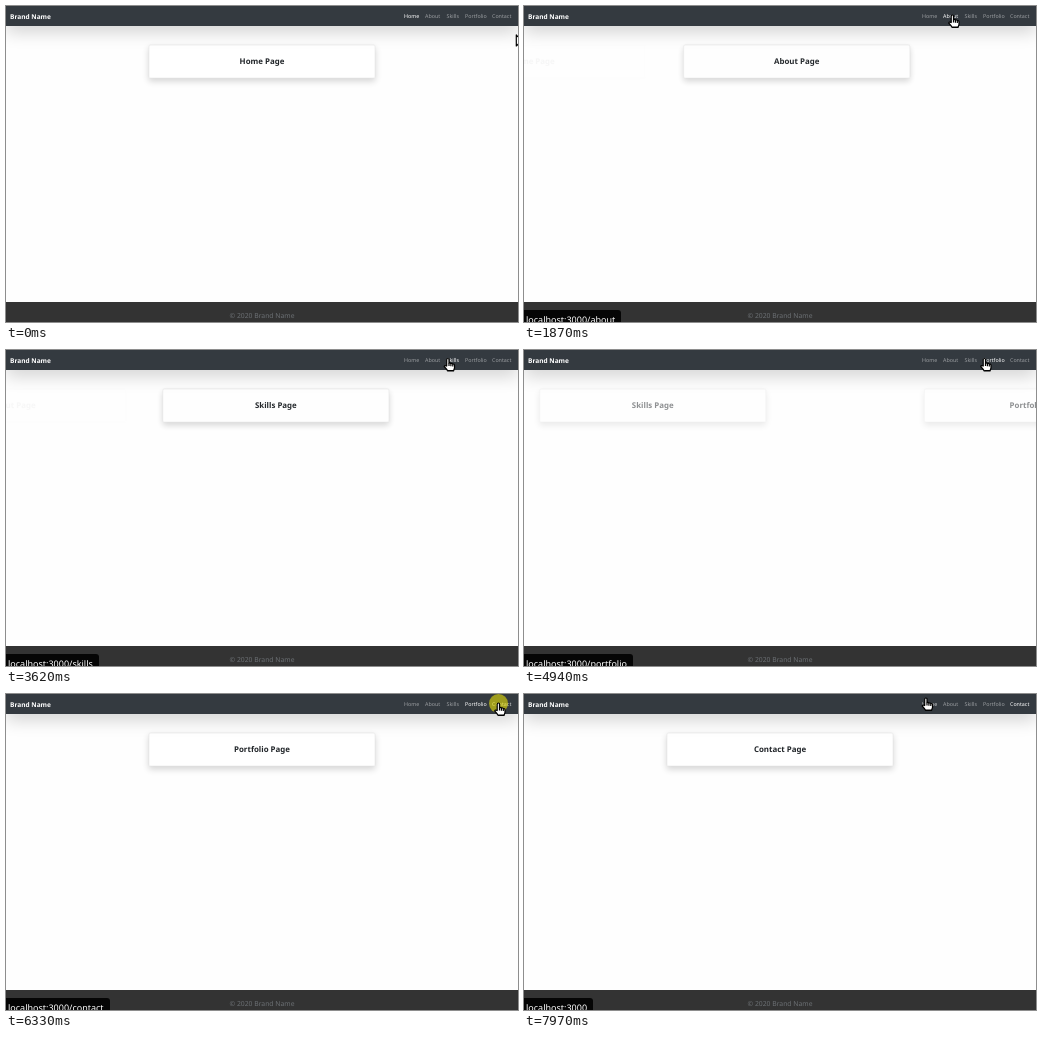
Animation of 512x316 px, one loop 8000 ms. Source, as an HTML page:

```html
<!DOCTYPE html>
<html lang="en">
<head>
<meta charset="utf-8">
<title>Page transitions</title>
<style>
  html, body { margin: 0; width: 100%; height: 100%; overflow: hidden; }
  body {
    position: relative;
    background: #fefefe;
    font-family: "Noto Sans", "Open Sans", sans-serif;
    text-rendering: geometricPrecision;
    white-space: nowrap;
  }
  #stage { position: absolute; left: 0; top: 0; width: 512px; height: 316px; overflow: hidden; }
  #stage > * { position: absolute; }
  nav {
    left: 0; top: 0; width: 512px; height: 20px;
    line-height: 20px;
    background: #343a40;
    box-shadow: 0 6px 17px rgba(0, 0, 0, .175);
  }
  nav * { position: absolute; top: 0; }
  nav b { left: 4px; font-size: 6.55px; font-weight: 600; line-height: 21px; color: #fff; }
  nav span { font-size: 5.35px; color: rgba(255, 255, 255, .5); }
  nav .hover { color: rgba(255, 255, 255, .75); }
  nav .active { color: #fff; }
  .card {
    box-sizing: border-box;
    left: 142px; top: 38px; width: 227px; height: 34px;
    border: 1px solid rgba(0, 0, 0, .06);
    border-radius: 2px;
    background: #fff;
    box-shadow: 0 3px 6px rgba(0, 0, 0, .16);
    font-size: 7.9px; font-weight: 600; line-height: 32px;
    text-align: center;
    color: #212529;
  }
  footer {
    left: 0; top: 296px; width: 512px; height: 20px;
    background: #333;
    color: #6c7074;
    font-size: 6.8px; line-height: 27px;
    text-align: center;
  }
  #status {
    left: 0; top: 304px; height: 12px;
    padding: 0 6px 0 2px;
    overflow: hidden;
    border-radius: 0 3px 0 0;
    background: #050505;
    color: #fff;
    font-size: 9px; line-height: 19px;
  }
  #press {
    width: 19px; height: 19px;
    margin: -9.5px;
    border-radius: 50%;
    background: rgba(255, 246, 0, .53);
  }
  #cursor { left: 0; top: 0; width: 512px; height: 316px; }
  #cursor path { fill: #fff; stroke: #000; stroke-width: 1.2; stroke-linejoin: round; }
</style>
</head>
<body>
<div id="stage">
  <nav><b>Brand Name</b></nav>
  <footer>© 2020 Brand Name</footer>
  <div id="status"></div>
  <div id="press"></div>
  <svg id="cursor" viewBox="0 0 512 316">
    <path id="arrow" d="M0 0V11L2.6 8.6L4.3 12.4L6 11.6L4.3 8H7.8Z"/>
    <g id="hand">
      <path d="M-1.3 7.5V1.2Q-1.3 0 -.1 0T1 1.2V4.6Q2 4 2.9 5Q4 4.5 4.8 5.5Q6.5 5.3 6.5 7V9.5Q6 11 5.5 12.5H-.3Q-1 11 -3.8 8Q-3.6 6.4 -1.3 7.5Z"/>
      <path d="M1 4.6V7.6M2.9 5V7.8M4.8 5.5V8M-.3 12H5.5"/>
    </g>
  </svg>
</div>
<script>
const LOOP = 8000, REFRESH = 77, WIDTH = 512;
const $ = id => document.getElementById(id);
const stage = $('stage'), nav = document.querySelector('nav');

// name, link position, mouse press, page opening
const pages = [
  ['Home', 398, 0, -LOOP],
  ['About', 419, 1150, 1440],
  ['Skills', 440.5, 2890, 3163],
  ['Portfolio', 459, 4550, 4807],
  ['Contact', 486, 6330, 6480]
].map(([name, left, press, open]) => {
  const link = document.createElement('span');
  link.textContent = name;
  link.style.left = left + 'px';
  nav.append(link);
  const card = document.createElement('div');
  card.className = 'card';
  card.textContent = name + ' Page';
  stage.prepend(card);
  const path = name === 'Home' ? '' : '/' + name.toLowerCase();
  return { left, press, open, path, link, card };
});

// pointer moves: departure, arrival, x, y
const moves = [
  [80, 840, 428.5, 9],
  [2200, 2280, 442, 8.5],
  [3900, 4080, 460.5, 8.5],
  [5570, 5720, 492.5, 9],
  [7570, 7940, 402, 4]
];

// critically damped spring, tension 170
function spring(ms) {
  const x = Math.max(0, ms) / 1000 * Math.sqrt(170);
  return 1 - (1 + x) * Math.exp(-x);
}

function pointer(t) {
  let x = 510.3, y = 29;
  for (const [from, to, toX, toY] of moves) {
    const p = Math.min(1, Math.max(0, (t - from) / (to - from)));
    const ease = p * (2 - p);
    x += (toX - x) * ease;
    y += (toY - y) * ease;
  }
  return [x, y];
}

function hoverAt(x, y) {
  return pages.find(p => y < 14 && x > p.left - 4 && x < p.left + p.link.offsetWidth + 3);
}

function show(el, on) { el.style.visibility = on ? 'visible' : 'hidden'; }

function draw(time) {
  // the screen refreshes in steps counted from the latest press
  const pressed = pages.filter(p => p.press <= time).pop();
  const t = time - (time - pressed.press) % REFRESH;
  const [x, y] = pointer(t);
  const hover = hoverAt(x, y);

  pages.forEach((page, i) => {
    const close = pages[i + 1] ? pages[i + 1].open : LOOP;
    const enter = spring(t - page.open), leave = spring(t - close);
    const shift = WIDTH * (1 - enter - leave / 2);
    page.card.style.transform = `translate(${shift + .5}px, .5px)`;
    page.card.style.opacity = enter * (1 - leave);
    const active = t >= page.open && t < close;
    page.link.className = active ? 'active' : page === hover ? 'hover' : '';
  });

  show($('status'), hover);
  if (hover) $('status').textContent = 'localhost:3000' + hover.path;

  show($('press'), time < pressed.open);
  $('press').style.left = x + 'px';
  $('press').style.top = y + .3 + 'px';

  for (const id of ['arrow', 'hand']) {
    $(id).setAttribute('transform', `translate(${x} ${y})`);
    show($(id), (id === 'hand') === Boolean(hover));
  }
}

const origin = performance.now();
function frame() {
  draw(Math.max(0, performance.now() - origin) % LOOP);
  requestAnimationFrame(frame);
}
frame();
</script>
</body>
</html>
```
